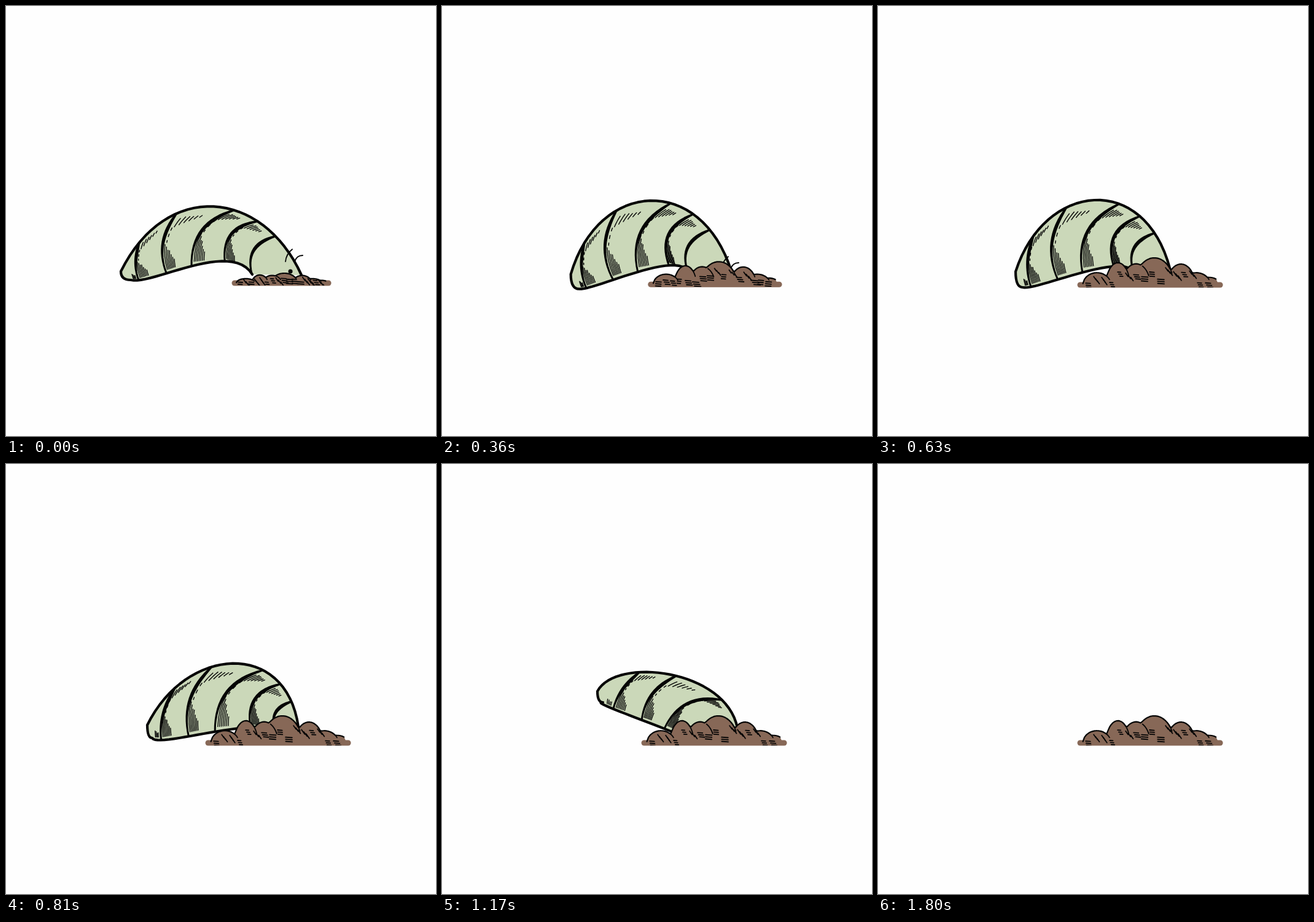
These frames come from a looping animation (700x700 px, 1.89 s). An HTML page with a canvas:

```html
<!DOCTYPE html>
<html lang="en">
<head>
<meta charset="utf-8">
<title>Burrowing grub</title>
<style>
  html, body { margin: 0; width: 100%; height: 100%; overflow: hidden; background: #fefefe; }
  canvas { display: block; width: 700px; height: 700px; }
</style>
</head>
<body>
<canvas id="stage" width="700" height="700"></canvas>
<script>
const ctx = document.getElementById('stage').getContext('2d');
const LOOP = 1890, STEP = 90, SETTLED = 480, SUNK = 1440;
const GREEN = '#cbd8b9', BROWN = '#876857', INK = '#050505';

const lerp = (a, b, k) => a + (b - a) * k;
const mix = (a, b, k) => a.map((v, i) => lerp(v, b[i], k));
const points = s => s.split(' ').map(p => p.split(',').map(Number));

function seeded(seed) {
  return () => {
    const s = Math.sin(++seed * 127.1) * 43758.5453;
    return s - Math.floor(s);
  };
}

// Each edge of the body is a cubic through four points, from tail to head.
const pose = (time, back, belly) => ({ time, pts: points(back + ' ' + belly) });
const shifted = (from, time, dx, dy) => ({ time, pts: from.pts.map(([x, y]) => [x + dx, y + dy]) });

const reach = pose(0, '187,432 282,336 393,341 481,438', '203,446 262,435 342,416 401,437');
const lift = pose(180, '197,430 283,331 394,333 474,434', '212,446 268,434 350,416 402,433');
const arch = pose(450, '216,440 288,332 390,326 470,432', '229,468 283,452 358,428 400,436');
const push = pose(810, '230,425 317,337 417,335 476,428', '238,446 282,446 365,432 437,432');
const tilt = pose(1170, '253,370 321,339 420,359 481,430', '262,388 282,400 352,427 400,448');
const dive = pose(SUNK, '315,377 350,359 434,386 482,424', '319,390 325,398 356,430 400,450');
const poses = [reach, lift, arch, shifted(arch, 540, 5, -4), push, tilt, dive, shifted(dive, 1800, 74, 50)];

// Where the rings meet the back and the belly, tail first
const BACK_STOPS = [.04, .12, .32, .6, .72, .82];
const BELLY_STOPS = [0, .1, .33, .5, .73, .99];

// Centre, radius and height of each lump, as shares of the mound
const LUMPS = [
  [.12, .1, .45], [.27, .085, .82], [.4, .1, .78], [.53, .14, 1], [.72, .1, .77], [.83, .1, .45], [.92, .08, .28]
];

function bodyAt(t) {
  const i = poses.findIndex(p => p.time > t), a = poses[i - 1], b = poses[i];
  return a.pts.map((p, n) => mix(p, b.pts[n], (t - a.time) / (b.time - a.time)));
}

// Point on the cubic that passes through p at 0, 1/3, 2/3 and 1
function along(p, t) {
  const a = 3 * t - 1, b = 3 * t - 2, c = t - 1;
  const w = [-a * b * c / 2, 4.5 * t * b * c, -4.5 * t * a * c, t * a * b / 2];
  return [0, 1].map(i => w.reduce((sum, v, n) => sum + v * p[n][i], 0));
}

const sample = (n, f) => Array.from({ length: n + 1 }, (_, i) => f(i / n));

function line(pts, width) {
  ctx.lineWidth = width;
  ctx.beginPath();
  pts.forEach(p => ctx.lineTo(...p));
  ctx.stroke();
}

// A ring bows towards the tail, more so nearer the head.
function makeRing(top, low, i) {
  const bow = 2 * Math.min(.26, .05 + .05 * i), dx = low[0] - top[0], dy = low[1] - top[1];
  const bend = [(top[0] + low[0]) / 2 - dy * bow, (top[1] + low[1]) / 2 + dx * bow];
  return v => mix(mix(top, bend, v), mix(bend, low, v), v);
}

function drawRing(ring) {
  const edge = sample(16, ring);
  const inner = sample(16, v => ring(v).map(c => c + 14 * v * (1 - v) ** 2)).reverse();
  line(edge.concat(inner), 3);
  ctx.fill();
}

function shade(a, b, isTail) {
  const rand = seeded(7);
  const stroke = (u, from, to) => line(sample(4, k => {
    const v = lerp(from, to, k);
    return mix(a(v), b(v), u);
  }), 1.4);
  const count = isTail ? 4 : 7;
  for (let k = 0; k < count; k++) {
    const rise = (isTail ? .14 : .36) * (1 - k / count) + .05 * rand();
    stroke((isTail ? .4 : .08) + (isTail ? .11 : .05) * k, .95, .93 - rise);
  }
  if (isTail) return;
  for (let k = 0; k < 6; k++) stroke(.16 + .08 * k, .07 + .04 * rand(), .27 - .025 * k);
  for (let v = .28; v < .55; v += .11) stroke(.12, v, v + .03 + .05 * rand());
}

function drawBody(t) {
  const p = bodyAt(t), back = p.slice(0, 4), belly = p.slice(4), tail = back[0], heel = belly[0];
  const slide = .4 * Math.min(1, t / SUNK) ** 3;
  const stop = (s, i) => Math.min(1, s + (i && slide));
  const rings = BACK_STOPS.map((s, i) =>
    makeRing(along(back, stop(s, i)), along(belly, stop(BELLY_STOPS[i], i)), i));

  const skin = new Path2D();
  sample(24, k => along(belly, 1 - k)).forEach(q => skin.lineTo(...q));
  skin.quadraticCurveTo(tail[0], heel[1], ...tail);
  sample(32, k => along(back, k)).forEach(q => skin.lineTo(...q));

  // Nothing shows below the ground under the mound.
  ctx.save();
  ctx.beginPath();
  ctx.rect(0, 0, 700, 454);
  ctx.rect(0, 0, 325, 700);
  ctx.clip();
  ctx.fillStyle = GREEN;
  ctx.fill(skin);
  ctx.fillStyle = INK;
  rings.forEach((ring, i) => {
    if (BACK_STOPS[i] + slide > .93) return;
    if (i < 5) shade(ring, rings[i + 1], i === 0);
    if (i > 0) drawRing(ring);
  });
  ctx.lineWidth = 4.2;
  ctx.stroke(skin);
  ctx.restore();
}

function drawHead(t) {
  if (t >= 540) return;
  ctx.save();
  ctx.translate(0, t / 30);
  ctx.lineWidth = 1.8;
  ctx.beginPath();
  ctx.moveTo(455, 416);
  ctx.quadraticCurveTo(456, 404, 466, 396);
  ctx.moveTo(470, 416);
  ctx.quadraticCurveTo(473, 406, 483, 406);
  ctx.stroke();
  ctx.fillStyle = INK;
  ctx.beginPath();
  ctx.arc(463, 432, 3.5, 0, 7);
  ctx.fill();
  ctx.restore();
}

function drawMound(t) {
  const grown = Math.min(1, t / SETTLED);
  const left = lerp(372, 329, grown), right = lerp(525, 557, grown);
  const base = lerp(451, 454, grown), height = lerp(16, 44, grown);
  const place = (u, h) => [lerp(left, right, u), base - h * height];
  const ridgeAt = u => Math.max(.05, ...LUMPS.map(([c, r, h]) =>
    h * Math.sqrt(Math.max(0, 1 - ((u - c) / r) ** 2))));
  const ridge = sample(90, k => {
    const u = lerp(.02, .97, k);
    return place(u, ridgeAt(u));
  });

  const soil = new Path2D();
  [[left, base + 4], ...ridge, [right, base + 4]].forEach(p => soil.lineTo(...p));
  ctx.fillStyle = ctx.strokeStyle = BROWN;
  ctx.fill(soil);
  line([[left, base], [right, base]], 9);

  ctx.strokeStyle = INK;
  line(ridge, 2.2);
  ctx.save();
  ctx.clip(soil);
  for (const [c, r, h] of LUMPS) {
    line(sample(6, k => {
      const a = lerp(1.1, .45, k);
      return place(c + r * Math.cos(a), h * Math.sin(a));
    }), 1.8);
  }

  // Dash groups lie flat near the ground and turn steep towards the ridge.
  const rand = seeded(20 + Math.min(t, 540) / STEP);
  for (let g = 0; g < 16; g++) {
    const u = .04 + .057 * g, level = .15 + .7 * rand(), [x, y] = place(u, ridgeAt(u) * level);
    const steep = level > .6 ? 1 : .1, length = 5 + 7 * rand(), lean = 3 * rand() - 1;
    for (let k = 0; k < 3; k++) {
      const a = x + k * (steep * 3 + lean), b = y + k * 3.4;
      line([[a, b], [a + length * (1 - steep / 2), b + length * steep * .7]], 1.8);
    }
  }
  ctx.restore();
}

function draw(now) {
  const t = Math.floor((now % LOOP) / STEP) * STEP;
  ctx.fillStyle = '#fefefe';
  ctx.fillRect(0, 0, 700, 700);
  ctx.lineCap = ctx.lineJoin = 'round';
  ctx.strokeStyle = INK;
  if (t < 1800) drawBody(t);
  drawHead(t);
  drawMound(t);
}

let start;
function tick(now) {
  start ??= now;
  draw(now - start);
  requestAnimationFrame(tick);
}
draw(0);
requestAnimationFrame(tick);
</script>
</body>
</html>
```
